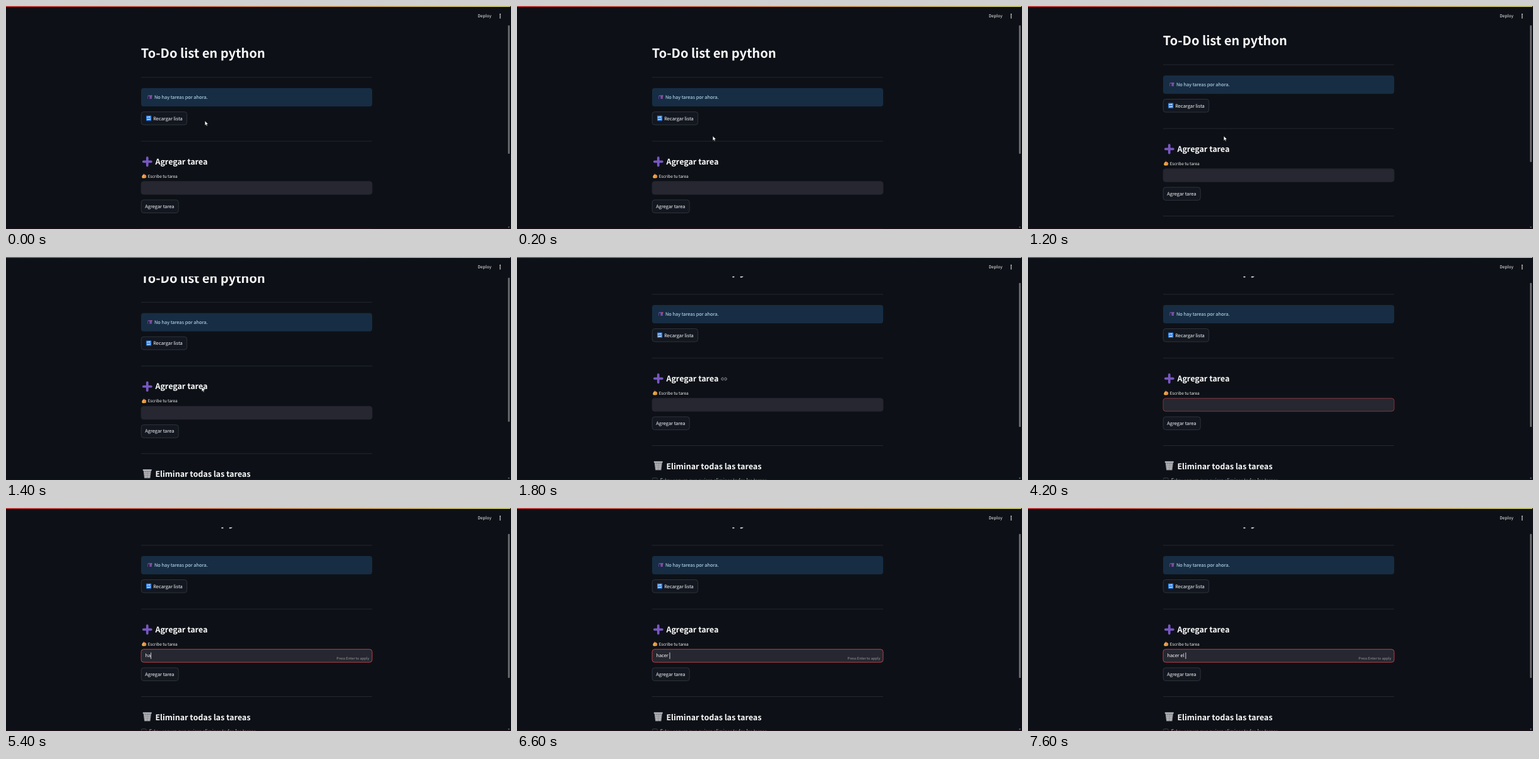
An HTML page for the animation above (8000 ms loop, 800 by 353 pixels).

```html
<!DOCTYPE html>
<html lang="es">
<head>
<meta charset="utf-8">
<title>To-Do list en python</title>
<style>
  html, body { margin: 0; width: 100%; height: 100%; overflow: hidden; background: #0d1117; }
  svg { display: block; width: 100vw; height: 100vh; }
  text {
    font: 400 7.45px "Noto Sans CJK JP", "Noto Sans CJK SC", "Noto Sans CJK", "Noto Sans", sans-serif;
    fill: #fafafa;
    text-rendering: geometricPrecision;
  }
  .title { font-size: 20px; font-weight: 700; }
  .heading { font-size: 12.5px; font-weight: 700; }
  .label { font-size: 6.5px; }
  .deploy { font-size: 6.6px; }
  .hint { font-size: 5.6px; fill: #9b9ca2; }
  .info { fill: #c7ebff; }
  .rule { stroke: #303238; stroke-width: .7; }
  .button { fill: #131720; stroke: #3c3f46; stroke-width: .7; }
</style>
</head>
<body>
<svg viewBox="0 0 800 353" preserveAspectRatio="none">
  <defs>
    <linearGradient id="stripe">
      <stop stop-color="#ff4b4b"/><stop offset="1" stop-color="#fffd80"/>
    </linearGradient>
    <linearGradient id="violet" x2="1" y2="1">
      <stop stop-color="#8a68cf"/><stop offset="1" stop-color="#6547b0"/>
    </linearGradient>
    <clipPath id="view"><rect y="30.7" width="800" height="323"/></clipPath>
  </defs>
  <rect width="800" height="353" fill="#0d1117"/>

  <g clip-path="url(#view)">
    <g id="page">
      <text class="title" x="213.8" y="82">To-Do list en python</text>
      <path class="rule" d="M214 113H580M214 214H580M214 352.5H580"/>

      <rect x="214" y="130" width="366" height="29" rx="4" fill="#172d43"/>
      <g id="mailbox">
        <path d="M224.3 147V143.2Q224.3 141.3 226 141.3H231V147Z" fill="#6c50a8"/>
        <path d="M225 147V143.4Q226.2 141.6 227.4 143.4V147Z" fill="#2a2144"/>
        <path d="M229.2 143.9V141.4H231.6V143H229.8V143.9Z" fill="#c24a68"/>
      </g>
      <text class="info" x="234.9" y="147.3">No hay tareas por ahora.</text>

      <rect class="button" x="214.2" y="167.5" width="72.4" height="20.6" rx="4"/>
      <g id="reload">
        <rect x="222" y="173.5" width="8.2" height="8.2" rx="1" fill="#2f7fe0"/>
        <path d="M223.9 177V175.8H227.6M228.3 178.2V179.5H224.6" fill="none" stroke="#fff" stroke-width=".9"/>
        <path d="M227.2 174.5L228.8 175.8L227.2 177.1ZM225 178.2L223.4 179.5L225 180.8Z" fill="#fff"/>
      </g>
      <text x="233.2" y="180.6">Recargar lista</text>

      <path d="M223.8 240V252.6M217.8 246.3H229.9" stroke="#7857c2" stroke-width="3.7" stroke-linecap="round"/>
      <text class="heading" x="236.4" y="250.8">Agregar tarea</text>
      <g id="anchor" fill="none" stroke="#a6a8ad" stroke-width=".9">
        <path d="M327.1 245.1H325.6A1.9 1.9 0 0 0 325.6 248.9H327.1M328.9 245.1H330.4A1.9 1.9 0 0 1 330.4 248.9H328.9M326.2 247H329.8"/>
      </g>

      <g id="hand">
        <path d="M215.2 271.2Q215.6 267.5 218 266.6L220.6 267L222.6 269.4L221.4 270.4L222.4 271.8L219.4 272.6H216.4Z" fill="#f6b04a"/>
        <path d="M217.2 269.4L220.6 271" stroke="#b8702a" stroke-width=".6"/>
        <path d="M218 265.4L220.8 270.2" stroke="#e25b45" stroke-width=".9"/>
      </g>
      <text class="label" x="224.7" y="271.6">Escribe tu tarea</text>
      <rect id="field" x="214.1" y="277.7" width="365.9" height="20.5" rx="4" fill="#262730" stroke-width=".9"/>
      <text id="typed" x="220.4" y="290.3"></text>
      <rect id="caret" y="282.7" width=".8" height="10.2" fill="#fafafa"/>
      <text id="hint" class="hint" x="523.6" y="294">Press Enter to apply</text>

      <rect class="button" x="214.2" y="306.9" width="59" height="20.6" rx="4"/>
      <text x="220.3" y="319.8">Agregar tarea</text>

      <g id="bin">
        <path d="M217.6 379.2H230L228.5 391.6H219.1Z" fill="#85878c"/>
        <path d="M219.6 380L221 391M222.3 380V391M225.2 380V391M228 380L226.6 391M218.5 383H229M218.8 386H228.8M219.2 389H228.4" stroke="#d3d4d7" stroke-width=".6"/>
        <rect x="216.7" y="377.6" width="14.2" height="2" rx=".8" fill="#c3c5c9"/>
      </g>
      <text class="heading" x="236.4" y="389.7">Eliminar todas las tareas</text>
      <rect x="214.6" y="403.8" width="7.6" height="7.6" rx="1.4" fill="none" stroke="#4a4c53" stroke-width=".8"/>
      <text x="226.8" y="409.6">Estoy seguro que quiero eliminar todas las tareas</text>
    </g>
    <rect id="thumb" x="795.2" width="2.8" height="228" rx="1.2" fill="#6b6b6d"/>
  </g>

  <path d="M795 349.4H798L796.5 351.2Z" fill="#8c8c8e"/>
  <rect width="799" height="1.2" fill="url(#stripe)"/>
  <rect y="352.3" width="799" height=".7" fill="#2a0e16"/>
  <text class="deploy" x="747.3" y="18.3">Deploy</text>
  <g fill="#fafafa">
    <circle cx="782.8" cy="13.2" r=".95"/>
    <circle cx="782.8" cy="15.9" r=".95"/>
    <circle cx="782.8" cy="18.6" r=".95"/>
  </g>
  <path id="cursor" d="M0 0V7L1.6 5.5L2.7 8L3.8 7.5L2.7 5.1H5Z" fill="#fff" stroke="#111" stroke-width=".35"/>
</svg>

<script>
const LOOP = 8000;

// Each track is a list of [start in ms, value]; values hold until the next step.
const tracks = {
  scroll: [[0, 0], [1200, 20], [1400, 41.3], [1600, 54]],
  cursor: [[0, [315.2, 182]], [200, [310.2, 206]], [1800, null]],
  anchor: [[0, false], [1800, true], [2600, false]],
  border: [[0, "#262730"], [3600, "#8f3741"], [5200, "#c9434a"]],
  caret: [[0, false], [3600, true], [4200, false], [4600, true]],
  typed: [[0, ""], [5200, "h"], [5400, "ha"], [5600, "hac"], [6000, "hace"], [6200, "hacer"],
    [6400, "hacer "], [7000, "hacer e"], [7200, "hacer el"], [7600, "hacer el "]],
};

const el = id => document.getElementById(id);
const at = (track, t) => track.findLast(([start]) => start <= t)[1];
const show = (id, on) => el(id).setAttribute("visibility", on ? "visible" : "hidden");
const move = (id, x, y) => el(id).setAttribute("transform", `translate(${x} ${y})`);

function draw(t) {
  const now = name => at(tracks[name], t);
  const scroll = now("scroll"), cursor = now("cursor"), typed = now("typed");

  move("page", 0, -scroll);
  el("thumb").setAttribute("y", 6 + scroll * 0.65);

  show("cursor", cursor);
  if (cursor) move("cursor", ...cursor);
  show("anchor", now("anchor"));

  el("field").setAttribute("stroke", now("border"));
  const field = el("typed");
  field.textContent = typed.replace(/ /g, "\u00a0");
  el("caret").setAttribute("x", 220.6 + (typed ? field.getComputedTextLength() : 0));
  show("caret", now("caret"));
  show("hint", typed);
}

function tick() {
  draw(performance.now() % LOOP);
  requestAnimationFrame(tick);
}
tick();
</script>
</body>
</html>
```
